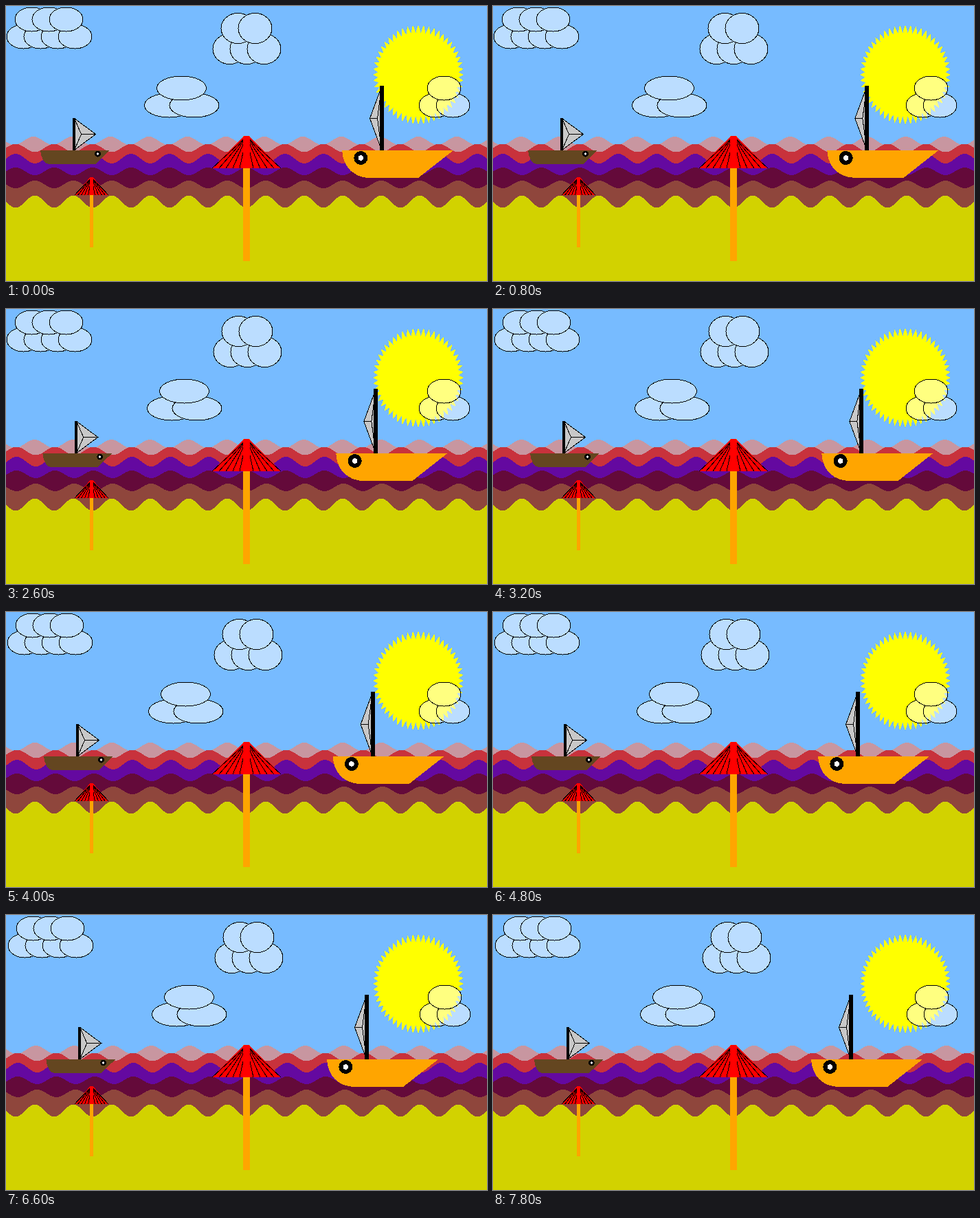
Recreate the animation shown at these times as an HTML page. Size 700 px wide and 400 px high, loop 8 s.

```html
<!DOCTYPE html>
<html lang="en">
<head>
<meta charset="utf-8">
<title>Seaside</title>
<style>
  html, body { margin: 0; width: 100%; height: 100%; overflow: hidden; background: #7bf; }
  svg { display: block; width: 700px; height: 400px; shape-rendering: crispEdges; }
  .line { fill: none; stroke: #000; stroke-width: 1; vector-effect: non-scaling-stroke; }
</style>
</head>
<body>
<svg id="stage" viewBox="0 0 700 400"></svg>
<script>
const STEP = 200, COUNT = 40, PERIOD = 56;
const range = (n, fn) => Array.from({ length: n }, (_, i) => fn(i));

// Each row of puffs: [count, first cx, spacing, cy]
const clouds = [
  { rx: 24.5, ry: 17.5, rows: [[4, 25.5, 25, 44.5], [3, 37.5, 25, 19.5]], move: n => Math.floor(n / 15) },
  { rx: 24.5, ry: 22, rows: [[3, 325.5, 25, 62.5], [2, 337.5, 25, 32.5]], move: n => Math.floor((n + 1) / 10) },
  { rx: 36, ry: 17.5, rows: [[2, 237.5, 36.5, 144.5], [1, 255.5, 0, 119.5]], move: n => Math.floor(n / 3) },
  { rx: 24.5, ry: 17.5, rows: [[2, 625.5, 25, 144.5], [1, 637.5, 0, 119.5]], move: n => Math.floor(n / 30) }
];

// Colour, middle height, amplitude, crest position, drift per step
const waves = [
  ['#c896a0', 196, 6, 40, .1],
  ['#c8323c', 206.5, 6, 14, .1],
  ['#6409a0', 222, 7, 14, .1],
  ['#640a3a', 240.5, 5.5, 14, .1],
  ['#8f463c', 259.5, 5.5, 42, .1],
  ['#d2d200', 284.5, 9, 42, 0]
];

function sun() {
  const spikes = 52;
  const points = range(spikes * 2, i => {
    const a = i * Math.PI / spikes - Math.PI / 2;
    const [rx, ry] = i % 2 ? [59, 61] : [66, 73];
    return `${(600 + rx * Math.cos(a)).toFixed(1)},${(100 + ry * Math.sin(a)).toFixed(1)}`;
  });
  return `<polygon fill="#ff0" points="${points.join(' ')}"/>`;
}

// The mask keeps only the outline parts not covered by later puffs.
function cloud({ rx, ry, rows }, i) {
  const puffs = rows.map(([n, x, dx, y]) =>
    range(n, k => `<ellipse cx="${x + k * dx}" cy="${y}" rx="${rx}" ry="${ry}"/>`).join('')).join('');
  return `<g id="cloud${i}">
    <mask id="edge${i}" maskUnits="userSpaceOnUse" x="0" y="0" width="700" height="200">
      <g fill="#000" stroke="#fff">${puffs}</g></mask>
    <g fill="#fff" opacity=".5">${puffs}</g>
    <rect width="700" height="200" mask="url(#edge${i})"/></g>`;
}

function wave([color, mid, amp, crest], i) {
  const points = range(421, k => {
    const x = k * 2 - 70;
    return `${x},${(mid - amp * Math.cos((x - crest) / PERIOD * 2 * Math.PI)).toFixed(2)}`;
  });
  return `<polygon id="wave${i}" fill="${color}" points="-70,400 ${points.join(' ')} 770,400"/>`;
}

function umbrella(x, y, sx, sy) {
  const ribs = range(5, k => `M0 1L${-10 - k * 10} 47M0 1L${10 + k * 10} 47`).join('');
  return `<g transform="translate(${x} ${y}) scale(${sx} ${sy})">
    <rect x="-5" width="10" height="182" fill="#ffa500"/>
    <path fill="#f00" d="M-4 0H4L50 47H-50Z"/>
    <path class="line" d="${ribs}"/>
    <rect x="-5" y="1" width="10" height="46" fill="#f00"/></g>`;
}

const sail = (outline, seams) =>
  `<path fill="#c8c8c8" d="${outline}"/><path class="line" d="${outline}${seams}"/>`;

const eye = (x, y, outer, inner) =>
  `<circle cx="${x}" cy="${y}" r="${outer}"/><circle cx="${x}" cy="${y}" r="${inner}" fill="#fff"/>`;

const smallBoat = `<g id="small">
  ${sail('M99.5 163.5L130.5 186.5L99.5 209.5Z', 'M99.5 163.5L109.5 186.5L99.5 209.5M109.5 186.5H130.5')}
  <rect x="97" y="163" width="4" height="47"/>
  <path fill="#644620" d="M50 210H151L130 230H62C55 230 51 220 50 210Z"/>
  ${eye(133.5, 215, 4.5, 1.7)}</g>`;

const bigBoat = `<g id="big">
  ${sail('M546.5 117.5L529.5 163.5L546.5 209.5Z', 'M546.5 117.5L540.5 163.5L546.5 209.5M529.5 163.5H540.5')}
  <rect x="544" y="116" width="6" height="94"/>
  <path fill="#ffa500" d="M489 210H651L600 250H530C506 250 490 234 489 210Z"/>
  ${eye(516.3, 221, 10, 3.7)}</g>`;

const stage = document.getElementById('stage');
stage.innerHTML = '<rect width="700" height="400" fill="#7bf"/>' + sun() +
  clouds.map(cloud).join('') + waves.map(wave).join('') + smallBoat + bigBoat +
  umbrella(350, 189, 1, 1) + umbrella(124.5, 249, .5, .56);

const shift = (id, x) =>
  document.getElementById(id).setAttribute('transform', `translate(${x} 0)`);

function draw(n) {
  clouds.forEach((c, i) => shift('cloud' + i, c.move(n)));
  waves.forEach((w, i) => shift('wave' + i, n * w[4]));
  shift('small', n / 4);
  shift('big', -n * 2 / 3);
}

const start = performance.now();
function tick() {
  draw(Math.floor((performance.now() - start) / STEP) % COUNT);
  requestAnimationFrame(tick);
}
draw(0);
requestAnimationFrame(tick);
</script>
</body>
</html>
```
